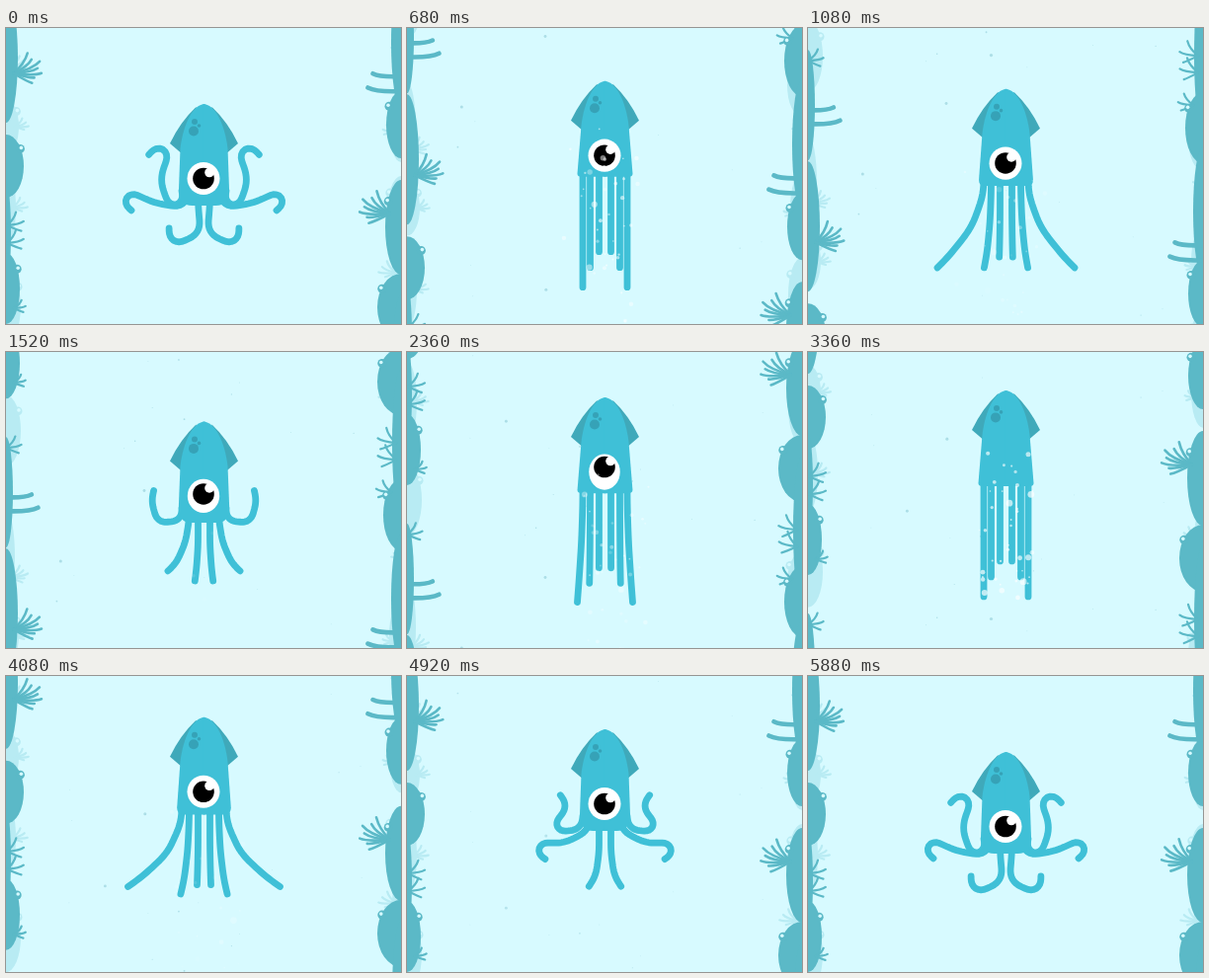
Write an HTML page with a canvas that moves like this. It is 400 by 300 pixels and loops after 5.92 s.

```html
<!DOCTYPE html>
<html lang="en">
<head>
<meta charset="utf-8">
<title>Swimming squid</title>
<style>
html, body { margin: 0; width: 100%; height: 100%; overflow: hidden; background: #d7faff; }
canvas { display: block; width: 400px; height: 300px; }
</style>
</head>
<body>
<canvas id="stage"></canvas>
<script>
const LOOP = 5920, TILE = 488, FAR = 0.8, RAD = Math.PI / 180;
const BODY = '#3fc0d7', FIN = '#3fa9ba', SPOT = '#36a2b7';
const NEAR_WALL = '#5bb9c7', FAR_WALL = '#b8ebf3', WATER = '#d7faff';

const canvas = document.getElementById('stage');
const ctx = canvas.getContext('2d');
const dpr = window.devicePixelRatio || 1;
canvas.width = 400 * dpr;
canvas.height = 300 * dpr;

const mod = (a, n) => ((a % n) + n) % n;
const mix = (a, b, f) => a + (b - a) * f;
const smooth = u => u * u * (3 - 2 * u);

function random(seed) {
  return () => {
    seed = (seed * 1664525 + 1013904223) >>> 0;
    return seed / 4294967296;
  };
}

// Monotone cubic through [time, value] keys
function track(keys) {
  const last = keys.length - 1;
  const rate = i => (keys[i + 1][1] - keys[i][1]) / (keys[i + 1][0] - keys[i][0]);
  const slope = keys.map((_, i) => {
    if (i === 0 || i === last) return 0;
    const a = rate(i - 1), b = rate(i);
    return a * b <= 0 ? 0 : 2 * a * b / (a + b);
  });
  return t => {
    let i = 0;
    while (i < last - 1 && t > keys[i + 1][0]) i++;
    const [t0, v0] = keys[i], [t1, v1] = keys[i + 1];
    const h = t1 - t0, u = Math.min(1, Math.max(0, (t - t0) / h)), w = 1 - u;
    return v0 * (1 + 2 * u) * w * w + v1 * (3 - 2 * u) * u * u
      + h * u * w * (slope[i] * w - slope[i + 1] * u);
  };
}

// Each stroke snaps the arms straight and lifts the head
const strokes = [
  { start: 190, curl: 3, low: 79, high: 53 },
  { start: 1640, curl: 1, low: 71, high: 42 },
  { start: 3060, curl: 0.9, low: 57, high: 37.5 }
];
const curl = track([[0, 3],
  ...strokes.flatMap(s => [[s.start, s.curl], [s.start + 290, 0], [s.start + 650, 0]]),
  [5720, 3], [LOOP, 3]]);
const headY = track([[0, 77],
  ...strokes.flatMap(s => [[s.start, s.low], [s.start + 360, s.high]]),
  [4920, 54], [5800, 77], [LOOP, 77]]);
const scroll = track([[0, 0], [200, 8], [680, 103], [1520, 235], [2360, 323], [3360, 414],
  [4700, 488], [LOOP, 488]]);
const lookUp = track([[0, 0], [900, 0], [2360, 5], [4000, 0], [LOOP, 0]]);
const eyeOpen = track([[0, 1], [3200, 1], [3300, 0], [3440, 0], [3560, 1], [LOOP, 1]]);
const dustAlpha = track([[0, 0], [150, 0], [600, 1], [4700, 1], [5500, 0], [LOOP, 0]]);

// Arms from outer to inner. Each pose, from stretched to curled:
// length, then headings along the arm (0 down, 90 outward, 180 up)
const arms = [
  { root: 22.5, poses: [[121, 0, 0, 0, 0], [60, 0, 90, 175, 205], [72, 5, 85, 220, 140], [98, -10, 160, 200, 40]] },
  { root: 15, poses: [[101, 0, 0, 0, 0], [67, 0, 10, 25, 50], [82, 5, 65, 95, -60], [90, 10, 100, 115, -50]] },
  { root: 6, poses: [[85, 0, 0, 0, 0], [73, 0, 0, 4, 8], [73, 0, 0, 8, 35], [83, 0, -5, 65, 180]] }
];

function armPath({ root, poses }, amount) {
  const steps = 30, from = Math.min(2, Math.floor(amount));
  const [length, ...headings] = poses[from].map((v, i) => mix(v, poses[from + 1][i], amount - from));
  const pts = [[root, 88]];
  for (let i = 0; i < steps; i++) {
    const s = (i + 0.5) / steps * 3, k = Math.floor(s);
    const a = mix(headings[k], headings[k + 1], smooth(s - k)) * RAD;
    const [x, y] = pts[i];
    pts.push([x + Math.sin(a) * length / steps, y + Math.cos(a) * length / steps]);
  }
  return pts;
}

function disc(x, y, rx, color, ry = rx) {
  ctx.fillStyle = color;
  ctx.beginPath();
  ctx.ellipse(x, y, rx, ry, 0, 0, 7);
  ctx.fill();
}

// rocks [y, half height, depth], fans [y, strands, length], tubes [y, length]
const leftNear = {
  rocks: [[30, 66, 12], [140, 32, 18], [208, 52, 5], [264, 36, 14], [395, 56, 7]],
  fans: [[46, 7, 25], [200, 3, 16], [218, 3, 16], [284, 3, 10], [350, 3, 14]],
  tubes: [[400, 24], [414, 31]]
};
const rightNear = {
  rocks: [[15, 66, 10], [98, 34, 15], [202, 48, 16], [283, 34, 24], [345, 75, 9], [418, 36, 18]],
  fans: [[188, 7, 27], [345, 3, 18], [362, 3, 18], [395, 3, 14]],
  tubes: [[49, 25], [64, 32]]
};
const leftFar = {
  rocks: [[20, 48, 9], [100, 28, 13], [182, 40, 10], [282, 36, 15]],
  fans: [[100, 4, 10], [182, 4, 12], [40, 5, 14]],
  tubes: []
};
const rightFar = {
  rocks: [[100, 36, 12], [188, 38, 14], [250, 34, 9], [366, 32, 15]],
  fans: [[105, 3, 8], [248, 4, 14], [20, 4, 10]],
  tubes: []
};

const depthAt = (wall, y) => Math.max(0, ...wall.rocks.map(([c, half, depth]) =>
  depth * Math.sqrt(Math.max(0, 1 - ((y - c) / half) ** 2))));

// A strand leaves the rock, then bends toward the surface
function strand(x, y, angle, length, width) {
  const dx = Math.cos(angle) * length, dy = Math.sin(angle) * length * 0.7;
  ctx.lineWidth = width;
  ctx.beginPath();
  ctx.moveTo(x - 4, y);
  ctx.quadraticCurveTo(x + dx * 0.7, y + dy * 0.6, x + dx, y + dy - length * 0.18);
  ctx.stroke();
}

function drawTile(wall, color, t) {
  ctx.strokeStyle = color;
  for (const [y, half, depth] of wall.rocks) disc(0, y, depth, color, half);
  for (const [y, count, length] of wall.fans) {
    const sway = 0.05 * Math.sin(t / LOOP * Math.PI * 6 + y);
    for (let i = 0; i < count; i++) {
      const angle = mix(-1.2, 0.9, i / (count - 1)) + sway;
      strand(depthAt(wall, y), y, angle, length * (1 - 0.18 * (i % 2)), length > 20 ? 2.6 : 2.2);
    }
  }
  for (const [y, length] of wall.tubes) strand(depthAt(wall, y) - 5, y, 0.1, length, 4.6);
  for (const [y, half, depth] of wall.rocks) {
    if (depth < 13) continue;
    const top = y - half * 0.55;
    disc(depth * 0.8, top, 4.5, color);
    disc(depth * 0.8 + 1, top - 1, 1.8, WATER);
  }
}

function drawWall(wall, right, offset, period, color, t) {
  for (const tile of [-1, 0, 1]) {
    ctx.save();
    if (right) {
      ctx.translate(400, 0);
      ctx.scale(-1, 1);
    }
    ctx.translate(0, mod(offset, period) + tile * period);
    drawTile(wall, color, t);
    ctx.restore();
  }
}

const rand = random(71);
const dust = Array.from({ length: 30 }, () => ({
  x: 30 + rand() * 340, y: rand() * TILE, r: 0.4 + rand() ** 4 * 1.3
}));

const bubbles = strokes.flatMap(({ start }) => Array.from({ length: 40 }, () => ({
  start: start + rand() * 160,
  life: 800 + rand() * 600,
  x: 174 + rand() * 52,
  y: 60 + rand() * 150,
  dx: (rand() - 0.5) * 60,
  dy: 50 + rand() * 120,
  r: 0.8 + rand() * rand() * 3.2
})));

function drawDust(t, shift) {
  ctx.globalAlpha = dustAlpha(t) * 0.6;
  for (const { x, y, r } of dust) disc(x, mod(y + shift, TILE), r, '#8fcbd7');
  ctx.globalAlpha = 1;
}

function drawBubbles(t) {
  for (const b of bubbles) {
    const age = (t - b.start) / b.life;
    if (age <= 0 || age >= 1) continue;
    const travel = 1 - (1 - age) ** 2;
    ctx.globalAlpha = 0.8 * Math.min(1, age * 8) * (1 - age);
    disc(b.x + b.dx * travel, b.y + b.dy * travel, b.r, '#fff');
  }
  ctx.globalAlpha = 1;
}

function drawArms(amount) {
  ctx.strokeStyle = BODY;
  ctx.lineWidth = 6.8;
  for (const arm of arms) {
    const pts = armPath(arm, amount);
    for (const side of [-1, 1]) {
      ctx.beginPath();
      for (const [x, y] of pts) ctx.lineTo(x * side, y);
      ctx.stroke();
    }
  }
}

function drawSquid(t) {
  const amount = curl(t), round = Math.min(1, amount);
  ctx.save();
  ctx.translate(200.5, headY(t));
  drawArms(amount);

  const hip = mix(28, 25.5, round), hem = mix(94, 86, round), low = mix(97, 103, round);
  const toe = mix(24, 12, round);
  for (const side of [-1, 1]) {
    ctx.save();
    ctx.scale(side, 1);
    ctx.fillStyle = FIN;
    ctx.beginPath();
    ctx.moveTo(8, 3);
    ctx.quadraticCurveTo(24, 18, 34.5, 40);
    ctx.lineTo(24, 49);
    ctx.lineTo(0, 45);
    ctx.fill();
    ctx.fillStyle = BODY;
    ctx.beginPath();
    ctx.moveTo(-1, 0);
    ctx.bezierCurveTo(11, 0, 21, 20, 24, 45);
    ctx.lineTo(hip, hem);
    ctx.quadraticCurveTo(hip, low, toe, low);
    ctx.lineTo(-1, low);
    ctx.fill();
    ctx.restore();
  }

  disc(-9.5, 18, 3, SPOT);
  disc(-10.5, 27.5, 5, SPOT);
  disc(-5, 22, 1.8, SPOT);

  const open = eyeOpen(t), look = lookUp(t);
  if (open > 0.02) {
    ctx.translate(-0.5, 75.5);
    ctx.scale(1, open);
    disc(0, 0, 16.5 - look * 0.15, '#fff', 16.6 + look * 0.3);
    disc(0, -look, 10.8, '#000');
    disc(6, -6 - look, 4.8, '#fff');
  }
  ctx.restore();
}

function draw(now) {
  const t = now % LOOP, shift = scroll(t);
  ctx.setTransform(dpr, 0, 0, dpr, 0, 0);
  ctx.fillStyle = WATER;
  ctx.fillRect(0, 0, 400, 300);
  ctx.lineCap = ctx.lineJoin = 'round';
  drawWall(leftFar, false, shift * FAR, TILE * FAR, FAR_WALL, t);
  drawWall(rightFar, true, shift * FAR, TILE * FAR, FAR_WALL, t);
  drawWall(leftNear, false, shift, TILE, NEAR_WALL, t);
  drawWall(rightNear, true, shift, TILE, NEAR_WALL, t);
  drawDust(t, shift);
  drawSquid(t);
  drawBubbles(t);
}

const begin = performance.now();
function frame() {
  draw(performance.now() - begin);
  requestAnimationFrame(frame);
}
frame();
</script>
</body>
</html>
```
